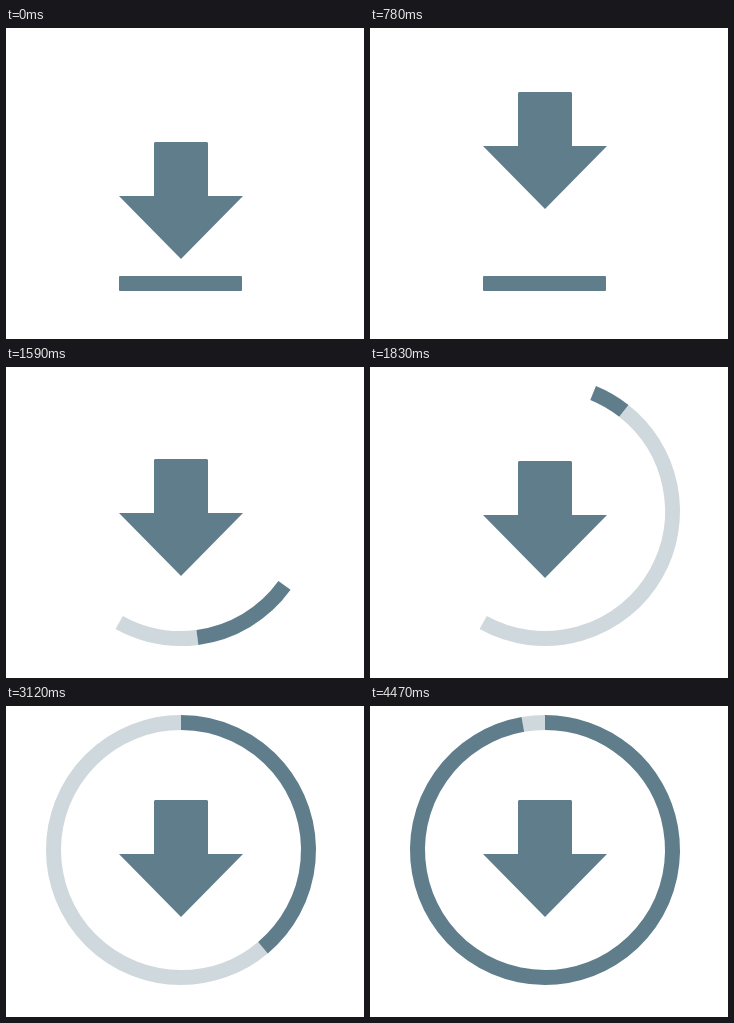
An HTML page with a canvas for the animation above (4500 ms loop, 358x311 px).

```html
<!DOCTYPE html>
<html lang="en">
<head>
<meta charset="utf-8">
<title>Download</title>
<style>
html, body { margin: 0; width: 100%; height: 100%; overflow: hidden; background: #fff; }
canvas { display: block; }
</style>
</head>
<body>
<canvas id="stage" width="358" height="311"></canvas>
<script>
const ctx = document.getElementById('stage').getContext('2d');
const LOOP = 4500, TICK = 30;
const DARK = '#607d8b', LIGHT = '#cfd8dc';
const CX = 175, CY = 144, R = 127.5, WIDTH = 15, HALF = 29;

const clamp = x => Math.max(0, Math.min(1, x));
const part = (t, a, b) => clamp((t - a) / (b - a));
const mix = (a, b, x) => a + (b - a) * x;
const smooth = x => x * x * (3 - 2 * x);
const wave = x => (1 - Math.cos(Math.PI * x)) / 2;

// Progress steps: [step, time]; each step adds ten degrees
const STEPS = [[1, 2280], [2, 2370], [5, 2580], [6, 2610], [14, 3120], [15, 3180],
  [22, 3630], [23, 3720], [31, 4200], [32, 4290], [35, 4470], [36, 4535]];

function progress(t) {
  if (t < STEPS[0][1]) return 0;
  let i = 0;
  while (i < STEPS.length - 2 && t >= STEPS[i + 1][1]) i++;
  const [n0, t0] = STEPS[i], [n1, t1] = STEPS[i + 1];
  return 10 * Math.floor(mix(n0, n1, part(t, t0, t1)) + 1e-6);
}

function arrowTop(t) {
  if (t < 840) return mix(114, 64, smooth(part(t, 450, 780)));
  if (t < 1080) return mix(64, 147, part(t, 840, 1080) ** 3);
  if (t < 1292) return mix(147, 82, wave(part(t, 1080, 1292)));
  return mix(82, 94, wave(part(t, 1292, 1700)));
}

function arrow(top) {
  ctx.fillStyle = DARK;
  ctx.beginPath();
  ctx.moveTo(148, top + 1);
  ctx.lineTo(149, top);
  ctx.lineTo(201, top);
  ctx.lineTo(202, top + 1);
  ctx.lineTo(202, top + 54);
  ctx.lineTo(237, top + 54);
  ctx.lineTo(175, top + 117);
  ctx.lineTo(113, top + 54);
  ctx.lineTo(148, top + 54);
  ctx.fill();
}

// Angles in degrees from the bottom, counterclockwise
function arc(from, to, color, r = R, cy = CY) {
  if (to <= from) return;
  const rad = a => (90 - a) * Math.PI / 180;
  ctx.strokeStyle = color;
  ctx.lineWidth = WIDTH;
  ctx.beginPath();
  ctx.arc(CX, cy, r, rad(from), rad(to), true);
  ctx.stroke();
}

function bar(sag) {
  if (sag < 0.3) {
    ctx.fillStyle = DARK;
    ctx.beginPath();
    ctx.roundRect(113, 248, 123, 15, 1);
    ctx.fill();
    return;
  }
  const h = 61.8;
  const r = (h * h + sag * sag) / (2 * sag);
  const a = Math.asin(h / r) * 180 / Math.PI;
  arc(-a, a, DARK, r, 255.5 + sag - r);
}

function swing(t) {
  if (t < 1320) return -20 * smooth(part(t, 1100, 1320));
  return -20 * (1 - part(t, 1320, 1500) ** 2);
}

function sweep(t) {
  const x = part(t, 1500, 2190);
  const u = 0.65 * x + 0.35 * smooth(x);
  const tail = -HALF + 360 * u;
  arc(-HALF, tail, LIGHT);
  arc(tail, tail + 2 * HALF * (1 - u) ** 2, DARK);
}

function draw(t) {
  ctx.fillStyle = '#fff';
  ctx.fillRect(0, 0, 358, 311);
  const top = arrowTop(t);
  if (t < 1080) {
    bar(Math.max(0, top + 117 - 248));
  } else if (t < 1500) {
    const turn = swing(t);
    arc(turn - HALF, turn + HALF, DARK);
  } else if (t < 2190) {
    sweep(t);
  } else {
    const p = progress(t);
    arc(-180, 180 - p, LIGHT);
    arc(180 - p, 180, DARK);
  }
  arrow(top);
}

const start = performance.now();
function frame() {
  const t = (performance.now() - start) % LOOP;
  draw(Math.floor(t / TICK) * TICK);
  requestAnimationFrame(frame);
}
frame();
</script>
</body>
</html>
```
